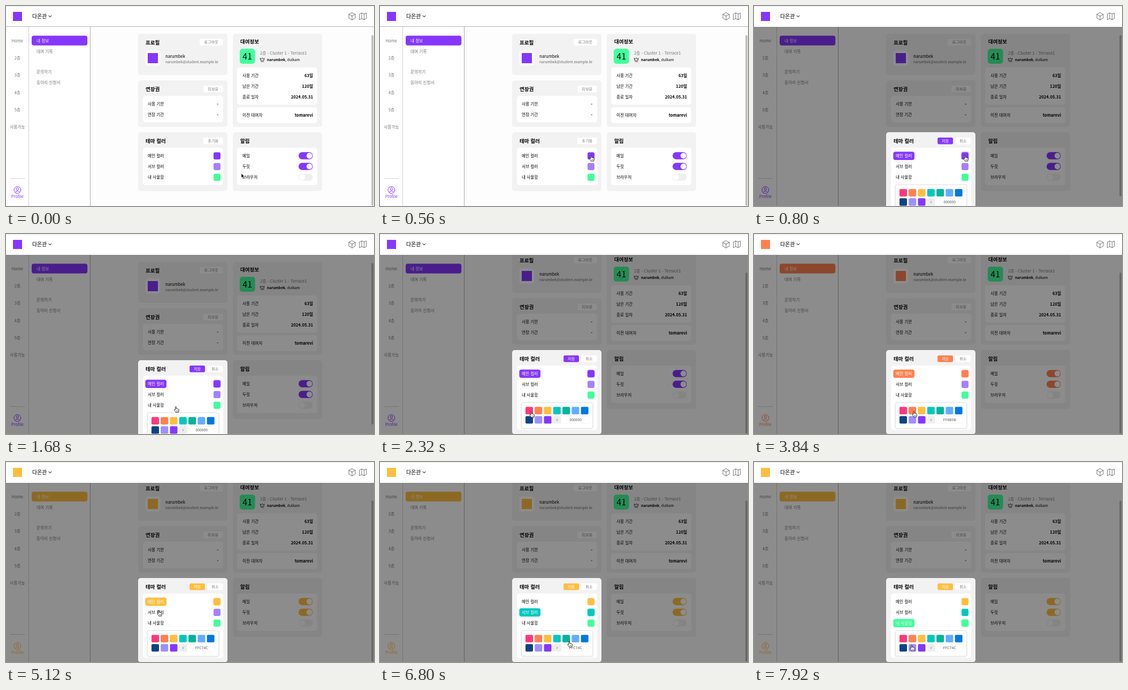
An HTML page that plays this animation: 688x374 px, repeating every 8000 ms.

```html
<!DOCTYPE html>
<html lang="ko">
<head>
<meta charset="utf-8">
<title>Theme settings</title>
<style>
html, body { margin: 0; width: 100%; height: 100%; overflow: hidden; background: #fff; }
svg { display: block; width: 688px; height: 374px; font-family: "Noto Sans CJK KR", "Noto Sans CJK", "Noto Sans", sans-serif; }
.main { fill: var(--main); }
.sub { fill: var(--sub); }
.mine { fill: var(--mine); }
.edge { stroke: var(--main); fill: none; }
.chip, .glow, .open { visibility: hidden; }
svg.editing .open { visibility: visible; }
svg.editing .closed { visibility: hidden; }
svg[data-row="0"] .row0 :is(.chip, .glow),
svg[data-row="1"] .row1 :is(.chip, .glow),
svg[data-row="2"] .row2 :is(.chip, .glow) { visibility: visible; }
svg[data-row="0"] .row0 text,
svg[data-row="1"] .row1 text,
svg[data-row="2"] .row2 text { fill: #fff; }
.glow { opacity: .4; filter: blur(1px); }
</style>
</head>
<body>
<svg id="stage" viewBox="0 0 688 374"></svg>
<script>
const stage = document.getElementById('stage');
const LOOP = 8000, STEP = 80, SCROLL = 19, TOP = 39;
const PALETTE = ['#ff387c', '#ff8050', '#ffbe40', '#00c8c0', '#00b49c',
  '#64acff', '#0078e0', '#0c4388', '#9e8fff', '#8537ff'];
const BODY = 7.68, SMALL = 6.7, TITLE = 9.5;
const INK = '#000', GRAY = '#777', CARD = '#f2f2f2';

const paint = c => c[0] === '#' ? `fill="${c}"` : `class="${c}"`;
const box = (x, y, w, h, r, c, extra = '') =>
  `<rect x="${x}" y="${y}" width="${w}" height="${h}" rx="${r}" ${paint(c)} ${extra}/>`;
const text = (s, x, y, { size = BODY, color = INK, weight = 400, anchor = 'start' } = {}) =>
  `<text x="${x}" y="${y + size * .37}" font-size="${size}" ${paint(color)} font-weight="${weight}" text-anchor="${anchor}">${s}</text>`;
const line = (d, c = '#555', w = .8) =>
  `<path d="${d}" fill="none" stroke="${c}" stroke-width="${w}" stroke-linejoin="round" stroke-linecap="round"/>`;
const title = (s, x, y) => text(s, x, y, { size: TITLE, weight: 700 });
const centered = (s, x, y, color = GRAY, size = BODY) => text(s, x, y, { color, size, anchor: 'middle' });
const button = (s, x, y, w, bg = '#ffffff', fg = GRAY) =>
  box(x, y, w, 12.5, 2.5, bg) + centered(s, x + w / 2, y + 6.2, fg, 7.2);
const pair = (label, value, x, right, y) =>
  text(label, x, y) + text(value, right, y, { weight: 700, anchor: 'end' });
const toggle = (label, y, on) => text(label, 442, y) +
  box(547, y - 6.7, 26.5, 13.4, 6.7, on ? 'main' : '#efefef') +
  `<circle cx="${on ? 567.2 : 553.5}" cy="${y}" r="5.4" fill="#fff"/>`;

function profileCards() {
  return box(247, 52, 167, 77, 5, CARD) + title('프로필', 261, 68) + button('로그아웃', 362, 61.5, 43.5) +
    box(260.5, 83.5, 28, 28, 5, '#ffffff') + box(265, 88, 19, 19, 0, 'main') +
    text('narumbek', 298, 94) +
    text('narumbek@student.example.kr', 298, 104.5, { size: SMALL, color: '#666' }) +
    box(247, 139, 167, 87, 5, CARD) + title('연장권', 261, 155) + button('미보유', 369, 149, 36.5) +
    box(256, 168, 150, 49.5, 5, '#ffffff') +
    pair('사용 기한', '-', 265, 397, 183.5) + pair('연장 기간', '-', 265, 397, 203.5);
}

function rentalCards() {
  return box(424, 52, 167, 174, 5, CARD) + title('대여정보', 438, 66) +
    box(437, 80, 28.6, 28, 5, 'mine') + centered('41', 451.2, 94.3, INK, 16) +
    text('2층 - Cluster 1 - Terrace1', 475, 88, { color: GRAY }) +
    line('M475.5 97.5l2 2 1.7-2.8 1.7 2.8 2-2-.8 4.5h-5.8zM476.5 104h5.5', '#222', .8) +
    `<text x="488" y="103" font-size="${SMALL}" fill="${INK}"><tspan font-weight="700">narumbek</tspan>, dulkam</text>` +
    box(432, 115, 150, 69.5, 5, '#ffffff') +
    pair('사용 기간', '63일', 442, 574, 130) + pair('남은 기간', '120일', 442, 574, 150) +
    pair('종료 일자', '2024.05.31', 442, 574, 170) +
    box(432, 189.5, 150, 29.5, 5, '#ffffff') + pair('이전 대여자', 'tomarevi', 442, 574, 204.5) +
    box(424, 236, 167, 110, 5, CARD) + title('알림', 438, 252) + box(432, 265, 150, 70, 5, '#ffffff') +
    toggle('메일', 280, true) + toggle('두릿', 300, true) + toggle('브라우저', 320, false);
}

function themeCard() {
  const rows = [['메인 컬러', 'main'], ['서브 컬러', 'sub'], ['내 사물함', 'mine']].map(([label, color], i) => {
    const y = 280.2 + 20 * i;
    return `<g class="row${i}">` + box(260.4, y - 7.8, 39.6, 15.6, 4, `chip ${color}`) + text(label, 265, y) +
      box(387.2, y - 7.5, 14.6, 15, 4, `glow ${color}`) + box(388, y - 6.7, 13, 13.4, 3.2, color) + '</g>';
  }).join('');
  const swatches = PALETTE.map((c, i) =>
    box(272 + 17.28 * (i % 7), 342.3 + 17.28 * Math.floor(i / 7), 14, 14, 2, c)).join('');
  const picker = box(264.5, 334.5, 133, 47.5, 2, '#ffffff', 'stroke="#ddd" stroke-width=".7" filter="url(#soft)"') +
    swatches + box(324, 359.5, 14.4, 14, 2, '#eeeeee') + centered('#', 331, 366.5, '#999', 6.7) +
    box(338.4, 359.8, 52, 13.5, 1.5, '#ffffff', 'stroke="#eee" stroke-width=".6"') +
    '<text id="hex" x="365.7" y="368.9" font-size="6.8" fill="#555" text-anchor="middle"></text>';
  return '<g class="closed">' + box(247, 236, 167, 110, 5, CARD) + box(256, 265, 150, 70, 5, '#ffffff') +
    button('초기화', 369, 246, 36.5) + '</g>' +
    '<g class="open">' + box(247, 236, 167, 157.5, 5, CARD) + box(256, 265, 150, 120.5, 5, '#ffffff') +
    button('저장', 343.2, 246, 28.8, 'main', '#ffffff') + button('취소', 376, 246, 29.5) + picker + '</g>' +
    title('테마 컬러', 261, 252) + rows;
}

function sidebar() {
  const floors = ['Home', '2층', '3층', '4층', '5층', '사용가능']
    .map((s, i) => centered(s, 21.3, 65 + 32.3 * i)).join('');
  const links = [['대여 기록', 85], ['문의하기', 123.5], ['동아리 신청서', 143.5]]
    .map(([s, y]) => text(s, 57, y, { color: GRAY })).join('');
  return box(0, 38, 157, 336, 0, '#ffffff') + line('M42.5 38V374', '#d0d0d0', 1) + line('M157.5 38V374', '#aaa', 1) +
    floors + line('M8 322.5H35', '#c4c4c4', .8) +
    '<g class="edge" stroke-width="1"><circle cx="21.3" cy="344" r="6.4"/><circle cx="21.3" cy="342.2" r="2.2"/><path d="M17 348.6c1.5-3.2 7.1-3.2 8.6 0"/></g>' +
    centered('Profile', 21.4, 356.3, 'main') +
    box(48, 55.4, 104.2, 18.4, 4, 'main') + text('내 정보', 57, 65, { color: '#ffffff' }) + links;
}

function header() {
  return box(0, 0, 688, TOP, 0, '#ffffff') + box(0, 0, 688, 1, 0, '#e4e4e4') +
    '<path class="closed" d="M0 38.5H688" stroke="#b5b5b5"/>' +
    box(13, 11, 17, 17, 0, 'main') +
    text('다온관', 49, 19, { size: 9.9, color: '#555', weight: 700 }) +
    line('M80 18l2.5 2.5 2.5-2.5', '#555', 1.1) +
    line('M647 12.5l6 3.2v7l-6 3.3-6-3.3v-7zM641 15.7l6 3.2 6-3.2M647 18.9v7.1') +
    line('M661 15l4-2 4.5 2 4-2v10.5l-4 2-4.5-2-4 2zM665 13v10.5M669.5 15v10.5');
}

const pointers =
  '<g id="pointer"><path id="arrow" d="M0 0V8.3L1.9 6.6 3.2 9.5 4.6 8.9 3.3 6.1H5.9z" fill="#000" stroke="#fff" stroke-width=".6"/>' +
  '<g id="hand" transform="translate(.7 .5)" stroke="#000"><path d="M-.9.7C-.9-.4.9-.4.9.7V3.8C1.3 3.2 2.5 3.4 2.6 4.2 3.2 3.7 4.2 4 4.2 4.8 5 4.4 5.8 4.8 5.8 5.7V7.4C5.8 8.5 5 9.1 5 10.6H-.2C-.4 9.3-1.7 8.3-2.6 6.8-3.6 5.3-2.1 4.6-.9 6z" fill="#fff" stroke-width=".8" stroke-linejoin="round"/>' +
  '<path d="M1.2 7v2M2.7 7v2M4.1 7v2" stroke-width=".5"/></g></g>';

stage.innerHTML =
  '<defs><filter id="soft" x="-10%" y="-10%" width="120%" height="130%"><feDropShadow dx="0" dy=".5" stdDeviation="1" flood-opacity=".2"/></filter></defs>' +
  box(0, 0, 688, 374, 0, '#fdfdfd') + `<g class="page">${profileCards()}${rentalCards()}</g>` + sidebar() +
  box(682, 38, 6, 336, 0, '#fafafa') + box(683.3, 54.5, 3.7, 319, 1.8, '#bdbdbd', 'id="thumb"') +
  `<path class="open" d="M0 ${TOP}H688V374H0z" fill="#000" opacity=".45"/>` +
  `<g class="page">${themeCard()}</g>` + header() + pointers;

const $ = id => document.getElementById(id);
const pages = stage.querySelectorAll('.page');

// time, x, y of the pointer's tip
const PATH = [
  [0, 440, 313], [560, 394, 279], [800, 394, 279], [1600, 318, 322], [2320, 282, 332],
  [2720, 281, 332], [3360, 297, 331], [3840, 298, 331], [4320, 314, 331], [4560, 314, 331],
  [5120, 285, 277], [5360, 284, 277], [6160, 331, 331], [6320, 331, 331], [6800, 353, 335],
  [7280, 286, 298], [7440, 285, 298], [7920, 294, 342]
];
// time, main color, hex label, sub color, selected row
const STATES = [
  [0, '#8537ff', '000000', '#a580ff', -1], [800, '#8537ff', '000000', '#a580ff', 0],
  [2560, PALETTE[0], 'FF4589', '#a580ff', 0], [3520, PALETTE[1], 'FF8B5B', '#a580ff', 0],
  [4480, PALETTE[2], 'FFC74C', '#a580ff', 0], [5280, PALETTE[2], 'FFC74C', '#a580ff', 1],
  [6320, PALETTE[2], 'FFC74C', PALETTE[3], 1], [7360, PALETTE[2], 'FFC74C', PALETTE[3], 2]
];
const ease = p => p * p * (3 - 2 * p);
const progress = (t, a, b) => ease(Math.min(1, Math.max(0, (t - a) / (b - a))));

function pointerAt(t) {
  const i = PATH.findLastIndex(p => p[0] <= t);
  const [a, x, y] = PATH[i], [b, nx, ny] = PATH[i + 1] || [LOOP, x, y];
  const p = progress(t, a, b);
  return [x + (nx - x) * p, y + (ny - y) * p];
}

function render(t) {
  const [, main, hex, sub, row] = STATES.findLast(s => s[0] <= t);
  const editing = row >= 0;
  stage.style.setProperty('--main', main);
  stage.style.setProperty('--sub', sub);
  stage.style.setProperty('--mine', '#42ff9a');
  stage.dataset.row = row;
  stage.classList.toggle('editing', editing);
  $('hex').textContent = hex;

  const scroll = progress(t, 1680, 2080);
  pages.forEach(g => g.setAttribute('transform', `translate(0 ${-SCROLL * scroll})`));
  $('thumb').setAttribute('y', 54.5 + 17.5 * scroll);
  $('thumb').setAttribute('height', editing ? 301.5 : 319);

  $('pointer').setAttribute('transform', `translate(${pointerAt(t)})`);
  const overLink = t >= 480;
  $('arrow').style.display = overLink ? 'none' : '';
  $('hand').style.display = overLink ? '' : 'none';
}

const start = performance.now();
function tick() {
  const t = (performance.now() - start) % LOOP;
  render(Math.floor(t / STEP) * STEP);
  requestAnimationFrame(tick);
}
tick();
</script>
</body>
</html>
```
